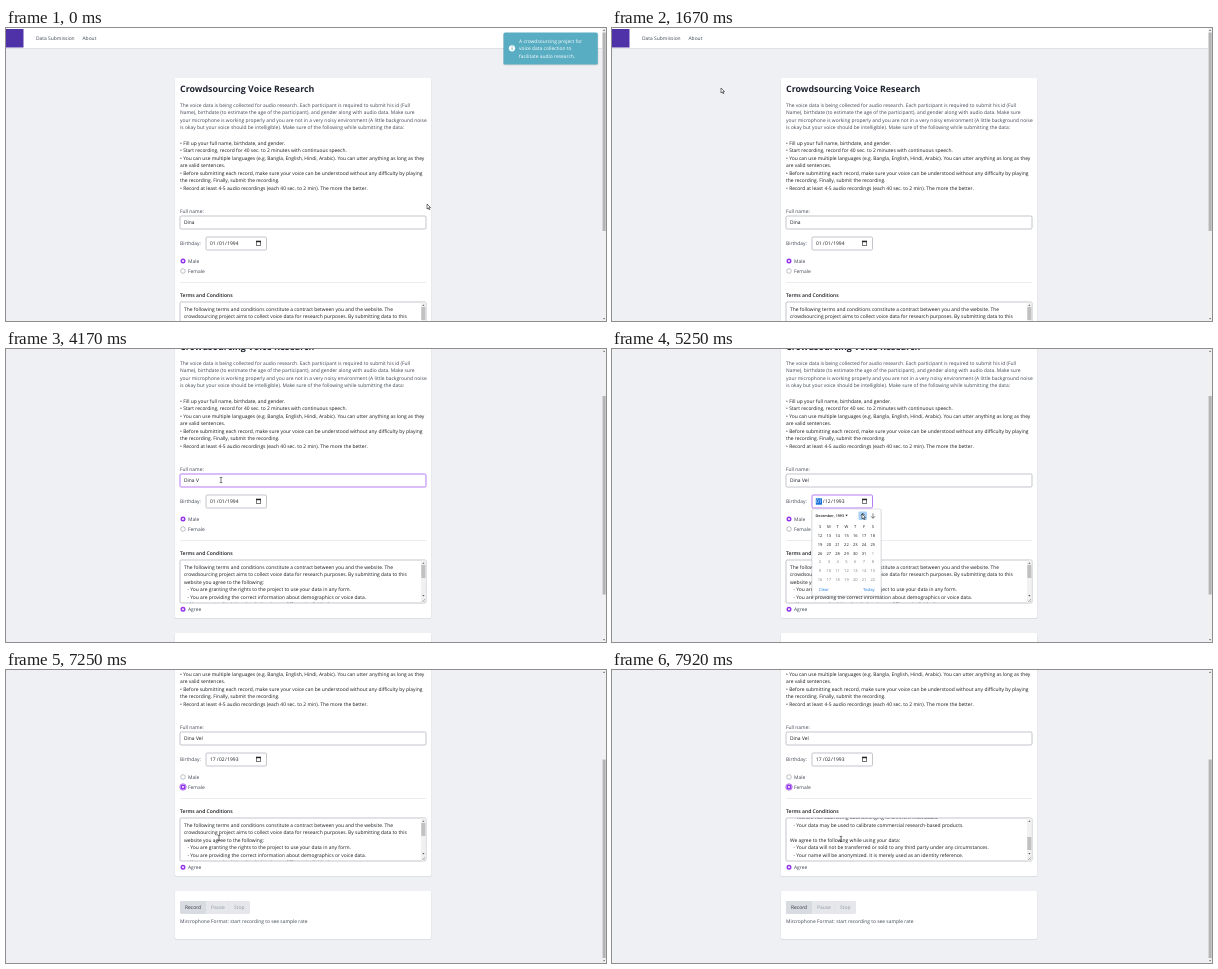
Write an HTML page that moves like this. It is 600x293 px and loops after 8000 ms.

```html
<!DOCTYPE html>
<html lang="en">
<head>
<meta charset="utf-8">
<title>Voice data form</title>
<style>
  html, body { margin: 0; width: 100%; height: 100%; overflow: hidden; background: #eef0f3; }
  svg { display: block; }
  #stage { width: 600px; height: 293px; }
  text { font-family: "Open Sans", "Noto Sans", sans-serif; text-rendering: geometricPrecision; }
</style>
</head>
<body>
<svg id="stage" viewBox="0 0 600 293"></svg>
<script>
const LOOP = 8000, FPS = 12, PURPLE = '#9333ea', GREY = '#3d4450', INK = '#14171c';

const INTRO = [
  'The voice data is being collected for audio research. Each participant is required to submit his id (Full',
  'Name), birthdate (to estimate the age of the participant), and gender along with audio data. Make sure',
  'your microphone is working properly and you are not in a very noisy environment (A little background noise',
  'is okay but your voice should be intelligible). Make sure of the following while submitting the data:'];
const RULES = [
  '• Fill up your full name, birthdate, and gender.',
  '• Start recording, record for 40 sec. to 2 minutes with continuous speech.',
  '• You can use multiple languages (e.g. Bangla, English, Hindi, Arabic). You can utter anything as long as they',
  'are valid sentences.',
  '• Before submitting each record, make sure your voice can be understood without any difficulty by playing',
  'the recording. Finally, submit the recording.',
  '• Record at least 4-5 audio recordings (each 40 sec. to 2 min). The more the better.'];
const TERMS = [
  'The following terms and conditions constitute a contract between you and the website. The',
  'crowdsourcing project aims to collect voice data for research purposes. By submitting data to this',
  'website you agree to the following:',
  '- You are granting the rights to the project to use your data in any form.',
  '- You are providing the correct information about demographics or voice data.',
  '- You are not submitting data belonging to different individuals.',
  '- Your data may be used to calibrate commercial research-based products.',
  '',
  'We agree to the following while using your data:',
  '- Your data will not be transferred or sold to any third party under any circumstances.',
  '- Your name will be anonymized. It is merely used as an identity reference.'];
const MONTHS = ['January', 'February', 'March', 'April', 'May', 'June', 'July',
  'August', 'September', 'October', 'November', 'December'];

// Key poses: [step, value...], twelve steps per second
const SCROLL = [[38, 0], [39, 5], [41, 31], [43, 36], [46, 63], [79, 63], [80, 68], [82, 95], [84, 126]];
const TERMS_SCROLL = [[89, 0], [90, 6], [92, 28], [95, 45]];
const TOAST = [[7, 1], [13, 0]];
const WEEK = [[61, 0], [63, -2], [73, -47]];
const POINTER = [[0, 421, 176], [6, 335, 112], [8, 335, 112], [13, 303, 65], [18, 303, 65], [20, 109, 60],
  [42, 109, 60], [46, 215, 131], [52, 215, 131], [56, 252, 151], [58, 252, 151], [61, 250, 165],
  [73, 250, 165], [75, 233, 203], [76, 233, 203], [78, 134, 154], [80, 134, 154], [84, 177, 117],
  [85, 177, 117], [87, 213, 168], [90, 213, 168], [95, 229, 169]];

const clamp = (v, lo, hi) => Math.max(lo, Math.min(hi, v));
const pad = n => String(n).padStart(2, '0');

function track(keys, k, i = 1) {
  const n = keys.findIndex(key => key[0] > k);
  if (n < 0) return keys[keys.length - 1][i];
  if (n === 0) return keys[0][i];
  const a = keys[n - 1], b = keys[n];
  return a[i] + (b[i] - a[i]) * (k - a[0]) / (b[0] - a[0]);
}

// Text is laid out at ten times its size so that small advances stay exact
const text = (x, y, s, fill = INK, size = 4.93, extra = '') =>
  `<text transform="translate(${x} ${y}) scale(.1)" font-size="${size * 10}" fill="${fill}" ${extra}>${s}</text>`;
const lines = (list, x, y, fill) => list.map((s, i) => text(x, y + i * 7.5, s, fill)).join('');
const rect = (x, y, w, h, fill, extra = '') =>
  `<rect x="${x}" y="${y}" width="${w}" height="${h}" fill="${fill}" ${extra}/>`;
const path = (d, fill, extra = '') => `<path d="${d}" fill="${fill}" ${extra}/>`;

const card = (y, h) => rect(168.6, y + .4, 256.8, h + .5, '#dcdfe4', 'rx="1.6"') +
  rect(169, y, 256, h, '#fff', 'rx="1.4"');
const field = (x, y, w, h, focus) => rect(x, y, w, h, '#fff',
  `rx="1.2" stroke="${focus ? '#a45cf0' : '#9ca0a8'}" stroke-width="${focus ? .8 : .6}"`);

function radio(y, label, on, focus) {
  const ring = focus ? `<circle cx="177" cy="${y}" r="3.2" fill="#fff" stroke="${PURPLE}" stroke-width=".7"/>` : '';
  const dot = on
    ? `<circle cx="177" cy="${y}" r="1.75" fill="#fff" stroke="${PURPLE}" stroke-width="1.5"/>`
    : `<circle cx="177" cy="${y}" r="2.3" fill="#fff" stroke="#7d828c" stroke-width=".5"/>`;
  return ring + dot + text(182, y + 1.8, label, GREY);
}

function nav() {
  return rect(0, 20, 600, .7, '#d9dce1') + rect(0, 0, 600, 20, '#fff') +
    rect(0, 1, 17.5, 18.5, '#4f32a8') +
    text(30, 11.8, 'Data Submission', GREY) + text(76.5, 11.8, 'About', GREY);
}

// Month reached in the date picker, as an offset from January 1994
const monthAt = k => k < 61 ? 0 : k < 64 ? -1 : -Math.min(k - 62, 11);
const monthDate = k => new Date(Date.UTC(1994, monthAt(k), 1));

function birthday(k) {
  const focus = k >= 57 && k < 84, d = monthDate(k);
  const day = k >= 76 ? '17' : '01';
  return text(174, 216.8, 'Birthday:', GREY) + field(200, 209, 60.5, 13, focus) +
    (focus ? rect(203.8, 212.3, 6.2, 6.4, '#1a73d8') : '') +
    text(204, 217, day, focus ? '#fff' : INK) + text(210.7, 217, '/') +
    text(213, 217, pad(d.getUTCMonth() + 1)) + text(219, 217, '/') +
    text(221.2, 217, d.getUTCFullYear()) +
    rect(250.3, 213.2, 4.4, 4.2, 'none', 'stroke="#222" stroke-width=".6"') +
    rect(250, 212.8, 5, 1.4, '#222');
}

function terms(k) {
  const s = track(TERMS_SCROLL, k), thumb = 279 + s * 14 / 45;
  const body = TERMS.map((line, i) =>
    text(line[0] === '-' ? 181.4 : 178, 8.3 + i * 7.5 - s, line)).join('');
  return field(174, 274, 246, 43) +
    `<svg x="0" y="274.3" width="415" height="42.4">${body}</svg>` +
    rect(415, 274.4, 4.7, 42.2, '#f1f1f1') + rect(415.3, thumb, 4.1, 13, '#c1c1c1') +
    path('M416.3 277.8h2.2l-1.1-1.4zM416.3 309h2.2l-1.1 1.4z', '#505050') +
    path('M416 316l3-3M417.8 316l1.2-1.2', 'none', 'stroke="#777" stroke-width=".5"');
}

function recorder() {
  return card(347, 48) + rect(174, 357, 70, 13, '#e5e7eb', 'rx="1.4"') +
    rect(174, 357, 26, 13, '#d8dbe0', 'rx="1.4"') + rect(222, 357, .3, 13, '#d8dbe0') +
    text(179, 365.4, 'Record', '#30353d') + text(205, 365.4, 'Pause', '#9298a3') +
    text(228, 365.4, 'Stop', '#9298a3') +
    text(174, 379.3, 'Mircrophone Format: start recording to see sample rate', GREY);
}

function page(k) {
  const female = k >= 84;
  const name = 'Dina' + ' Vel'.slice(0, clamp(k - 48, 0, 4));
  return nav() + card(50, 282) +
    text(174, 63.8, 'Crowdsourcing Voice Research', '#1f2430', 8.88, 'font-weight="700"') +
    lines(INTRO, 174, 78.8, GREY) + lines(RULES, 174, 116.8, INK) +
    text(174, 184.8, 'Full name:', GREY) + field(174, 188, 246, 13, k >= 46 && k < 57) +
    text(178, 196.3, name) + birthday(k) +
    radio(233, 'Male', !female) + radio(243, 'Female', female, female) +
    rect(174, 254.2, 246, .6, '#dcdfe4') +
    text(174, 268.7, 'Terms and Conditions', INK, 5.02, 'font-weight="600"') +
    terms(k) + radio(323.3, 'Agree', true) + recorder();
}

function calendar(k) {
  if (k < 57 || k > 75) return '';
  const shown = monthDate(k), month = shown.getUTCMonth();
  const top = Math.round(track(WEEK, k)) * 7;
  const cell = (col, y, s, fill) => text(208 + col * 8.8, y, s, fill, 4.05, 'text-anchor="middle"');
  let out = rect(199.4, 160, 70.2, 88.4, '#000', 'opacity=".1" rx="1.5"') +
    rect(200, 160, 69, 87, '#fff', 'rx="1" stroke="#c3c6cb" stroke-width=".5"') +
    text(203.6, 168, `${MONTHS[month]}, ${shown.getUTCFullYear()}`, INK, 3.65, 'font-weight="600"') +
    path('M233.4 165.8h2.4l-1.2 1.5z', INK);
  if (k >= 60 && k < 74) out += rect(246.5, 162.5, 8.5, 8.5, '#a9d0f5', 'rx="1"');
  out += path('M250.8 169.3v-5M248.7 166.3l2.1-2.1 2.1 2.1M261 164.3v5M258.9 167.2l2.1 2.1 2.1-2.1',
    'none', 'stroke="#333" stroke-width=".6"');
  [...'SMTWTFS'].forEach((s, i) => out += cell(i, 179.2, s, INK));
  for (let i = 0; i < 42; i++) {
    const d = new Date(Date.UTC(1993, 11, 26 + top + i));
    out += cell(i % 7, 188 + Math.floor(i / 7) * 8.75, d.getUTCDate(),
      d.getUTCMonth() === month ? INK : '#7b7f86');
  }
  return out + text(206.8, 241.8, 'Clear', '#1a73d8', 4.2) + text(251, 241.8, 'Today', '#1a73d8', 4.2);
}

function toast(k) {
  const o = track(TOAST, k);
  if (o <= 0) return '';
  return `<g opacity="${o}">` + rect(497, 5, 95.4, 32.6, '#000', 'opacity=".12" rx="2"') +
    rect(497.5, 4.5, 94.3, 32, '#58adc3', 'rx="1.6"') +
    '<circle cx="506" cy="20.3" r="3.1" fill="#fff"/>' +
    rect(505.6, 19.7, .9, 2.5, '#58adc3') + rect(505.6, 18.2, .9, .9, '#58adc3') +
    lines(['A crowdsourcing project for', 'voice data collection to', 'facilitate audio research.'],
      513, 14.8, '#fff') + '</g>';
}

function scrollbar(scroll) {
  return rect(596, 0, 4, 293, '#f1f1f1') + rect(596.6, 4.5 + scroll * .675, 3.1, 198.5, '#b4b4b4') +
    path('M597 2.8h2.2l-1.1-1.4zM597 290.2h2.2l-1.1 1.4z', '#505050');
}

function pointer(k) {
  const beam = (k >= 46 && k < 54) || k >= 86;
  const shape = beam
    ? path('M-1.3 -2.6h2.6M0 -2.6v5.2M-1.3 2.6h2.6', 'none', 'stroke="#222" stroke-width=".6"')
    : path('M0 0v5l1.2-1.1 .8 1.8 .8-.3-.8-1.8h1.6z', '#fff', 'stroke="#222" stroke-width=".6"');
  return `<g transform="translate(${track(POINTER, k)} ${track(POINTER, k, 2)})">${shape}</g>`;
}

const stage = document.getElementById('stage');
let last = -1;

function tick(now) {
  const k = Math.min(95, Math.floor((now % LOOP + 5) * FPS / 1000));
  if (k !== last) {
    last = k;
    const scroll = track(SCROLL, k);
    stage.innerHTML = rect(0, 0, 600, 293, '#eef0f3') +
      `<g transform="translate(0 ${-scroll})">${page(k)}</g>` +
      calendar(k) + toast(k) + scrollbar(scroll) + pointer(k);
  }
  requestAnimationFrame(tick);
}
tick(0);
</script>
</body>
</html>
```
